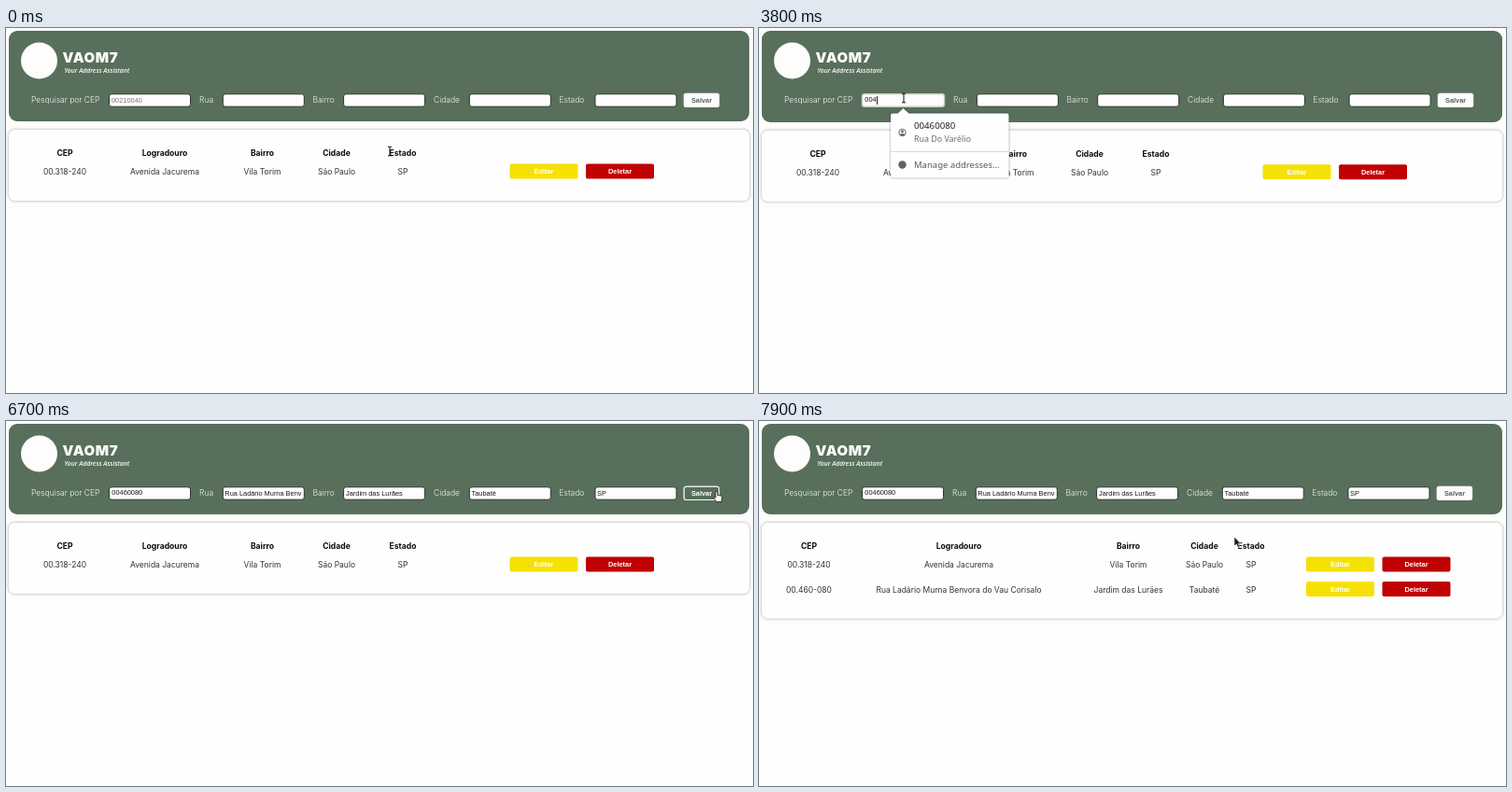
An HTML page that plays this animation: 800x391 px, repeating every 8 s.

```html
<!DOCTYPE html>
<html lang="pt-BR">
<head>
<meta charset="utf-8">
<title>Cadastro de endereços</title>
<style>
html, body { margin: 0; width: 100%; height: 100%; overflow: hidden; background: #fdfdfc; }
svg { display: block; width: 100vw; height: 100vh; }
text { font: 400 8.5px Inter, sans-serif; fill: #333; }
.labels text { fill: #f1f4f0; font-weight: 300; }
.mid text { text-anchor: middle; }
.head text { font-weight: 700; fill: #0c0c0c; font-size: 8.6px; }
.brand { font: 900 15px Inter, sans-serif; letter-spacing: .6px; fill: #fdfdfc; }
.tag { font: italic 600 6.8px "Open Sans", sans-serif; fill: #fdfdfc; }
.val text, .typed { font: 400 7.4px "Liberation Sans", Arial, sans-serif; fill: #151515; color: #151515; }
.val .hint { fill: #777; }
.btn text, .btn { font: 700 7.4px "Liberation Sans", Arial, sans-serif; text-anchor: middle; fill: #fff; }
.menu text { font: 400 9.5px "Noto Sans", sans-serif; fill: #55585c; }
.menu .pick { font-size: 9.7px; fill: #222; }
.menu .sub { font-size: 8.9px; fill: #6b6e72; }
.box rect { width: 87px; height: 13.4px; rx: 2.5px; fill: #fefefe; stroke: #2b332c; stroke-width: 1; }
.card { fill: #fefefe; stroke: #dcdcdc; filter: drop-shadow(0 0 .8px #ccc); }

.hint, .focus, .menu, .filled, .hover, .before, .after, .beam, .arrow, .hand, .dx, .dy, .typed, .cursor {
  animation: 8s step-end infinite;
}
.hint { animation-name: hint; }
.focus { animation-name: focus; }
.menu { animation-name: menu; }
.filled { animation-name: filled; }
.hover { animation-name: hover; }
.before { animation-name: before; }
.after { animation-name: after; }
.beam { animation-name: beam; }
.arrow { animation-name: arrow; }
.hand { animation-name: hand; }
.dx { animation-name: dx; }
.dy { animation-name: dy; }
.typed {
  height: 8.4px; line-height: 8.4px; width: 0; overflow: hidden; white-space: nowrap;
  border-right: .7px solid transparent;
  animation-name: type, caret;
}
.cursor { animation-name: move; }

@keyframes hint   { 0% { opacity: 1 } 41.25%, 100% { opacity: 0 } }
@keyframes focus  { 0% { opacity: 0 } 33.75% { opacity: 1 } 81.25%, 100% { opacity: 0 } }
@keyframes menu   { 0% { opacity: 0 } 42.5% { opacity: 1 } 81.25%, 100% { opacity: 0 } }
@keyframes filled { 0% { opacity: 0 } 82.5%, 100% { opacity: 1 } }
@keyframes hover  { 0% { opacity: 0 } 78.75% { opacity: 1 } 91.25%, 100% { opacity: 0 } }
@keyframes before { 0% { opacity: 1 } 88.75%, 100% { opacity: 0 } }
@keyframes after  { 0% { opacity: 0 } 88.75%, 100% { opacity: 1 } }
@keyframes beam   { 0% { opacity: 1 } 8.75% { opacity: 0 } 27.5% { opacity: 1 } 72.5%, 100% { opacity: 0 } }
@keyframes arrow  { 0% { opacity: 0 } 8.75% { opacity: 1 } 27.5% { opacity: 0 } 72.5% { opacity: 1 } 78.75% { opacity: 0 } 91.25%, 100% { opacity: 1 } }
@keyframes hand   { 0% { opacity: 0 } 78.75% { opacity: 1 } 91.25%, 100% { opacity: 0 } }
@keyframes dx { 0% { transform: none } 33.75% { transform: translate(1.1px, 0) } 81.25%, 100% { transform: none } }
@keyframes dy { 0% { transform: none } 33.75% { transform: translate(0, .8px) } 81.25%, 100% { transform: none } }
@keyframes type {
  0% { width: 0 } 41.25% { width: 1ch } 45% { width: 2ch } 47.5% { width: 3ch }
  51.25% { width: 4ch } 53.75% { width: 5ch } 56.25% { width: 6ch }
  58.75% { width: 7ch } 61.25%, 100% { width: 8.1ch }
}
@keyframes caret {
  0% { border-color: transparent } 33.75% { border-color: #222 } 40% { border-color: transparent }
  41.25% { border-color: #222 } 67.5%, 100% { border-color: transparent }
}
/* the pointer advances ten times a second */
@keyframes move {
  0%     { transform: translate(411px, 132px) }
  7.5%   { transform: translate(411px, 132px); animation-timing-function: steps(7) }
  16.25% { transform: translate(2px, 229px) }
  17.5%  { transform: translate(1px, 288px) }
  18.75% { transform: translate(8px, 280px) }
  20%    { transform: translate(8px, 280px); animation-timing-function: steps(7) }
  28.75% { transform: translate(156px, 78px) }
  33.75% { transform: translate(155px, 75px) }
  66.25% { transform: translate(155px, 75px); animation-timing-function: steps(9) }
  77.5%  { transform: translate(762px, 92px); animation-timing-function: steps(3) }
  81.25% { transform: translate(761px, 75px) }
  90%    { transform: translate(761px, 75px); animation-timing-function: steps(7) }
  98.75%, 100% { transform: translate(509px, 124px) }
}
</style>
</head>
<body>
<svg viewBox="0 0 800 391" preserveAspectRatio="none">
  <defs>
    <g id="actions" class="btn">
      <rect width="73" height="16" rx="2" fill="#f6e105"/>
      <text x="36.5" y="10.6">Editar</text>
      <rect x="81.5" width="73" height="16" rx="2" fill="#c10004"/>
      <text x="118" y="10.6">Deletar</text>
    </g>
  </defs>

  <!-- header -->
  <g fill="#586f5c">
    <rect x="3" y="3" width="793" height="97" rx="9"/>
    <rect class="focus" x="3" y="4" width="793" height="97" rx="9"/>
  </g>
  <circle cx="35.5" cy="35" r="19.5" fill="#fdfdfc"/>
  <text class="brand" x="60.5" y="37">VAOM7</text>
  <text class="tag" x="62.5" y="48.3">Your Address Assistant</text>

  <g class="labels"><text x="27" y="80">Pesquisar por CEP</text></g>
  <g class="box">
    <rect x="110.5" y="70.8"/>
    <rect class="focus" x="110.5" y="70.8" style="width:88px;stroke:#c9d0ca;stroke-width:1.4"/>
  </g>
  <g class="val"><text class="hint" x="113" y="80">00210040</text></g>
  <foreignObject x="113.3" y="73.3" width="80" height="9">
    <div class="typed">00460080</div>
  </foreignObject>

  <g class="dx">
    <g class="labels">
      <text x="207" y="80">Rua</text>
      <text x="328.5" y="80">Bairro</text>
      <text x="458" y="80">Cidade</text>
      <text x="592.5" y="80">Estado</text>
    </g>
    <g class="box">
      <rect x="232.3" y="70.8"/>
      <rect x="361.6" y="70.8"/>
      <rect x="496.3" y="70.8"/>
      <rect x="631" y="70.8"/>
    </g>
    <g class="val filled">
      <text x="234.3" y="80">Rua Ladário Murna Benv</text>
      <text x="364" y="80">Jardim das Lurães</text>
      <text x="498.5" y="80">Taubaté</text>
      <text x="633" y="80">SP</text>
    </g>
    <rect x="725.7" y="69.8" width="38.4" height="15.2" rx="2.5" fill="#fdfdfc"/>
    <text class="btn" x="745" y="80" style="fill:#56645a">Salvar</text>
    <g class="hover">
      <rect x="726.2" y="70.3" width="37.4" height="14.2" rx="2.5" fill="#586f5c" stroke="#fdfdfc"/>
      <text class="btn" x="745" y="80">Salvar</text>
    </g>
  </g>

  <!-- address list -->
  <g class="dy mid">
    <g class="before">
      <rect class="card" x="2.5" y="108.5" width="794" height="77" rx="7"/>
      <g class="head">
        <text x="63" y="137.2">CEP</text>
        <text x="170" y="137.2">Logradouro</text>
        <text x="274.5" y="137.2">Bairro</text>
        <text x="354" y="137.2">Cidade</text>
        <text x="425" y="137.2">Estado</text>
      </g>
      <text x="63" y="157">00.318-240</text>
      <text x="170" y="157">Avenida Jacurema</text>
      <text x="274.5" y="157">Vila Torim</text>
      <text x="354" y="157">São Paulo</text>
      <text x="425" y="157">SP</text>
      <use href="#actions" x="539.5" y="145.5"/>
    </g>
    <g class="after">
      <rect class="card" x="2.5" y="108.5" width="794" height="103.5" rx="7"/>
      <g class="head">
        <text x="53.5" y="137.2">CEP</text>
        <text x="214" y="137.2">Logradouro</text>
        <text x="395.5" y="137.2">Bairro</text>
        <text x="477" y="137.2">Cidade</text>
        <text x="527" y="137.2">Estado</text>
      </g>
      <text x="53.5" y="157">00.318-240</text>
      <text x="214" y="157">Avenida Jacurema</text>
      <text x="395.5" y="157">Vila Torim</text>
      <text x="477" y="157">São Paulo</text>
      <text x="527" y="157">SP</text>
      <use href="#actions" x="586" y="145.5"/>
      <text x="53.5" y="183.7">00.460-080</text>
      <text x="214" y="183.7">Rua Ladário Murna Benvora do Vau Corisalo</text>
      <text x="395.5" y="183.7">Jardim das Lurães</text>
      <text x="477" y="183.7">Taubaté</text>
      <text x="527" y="183.7">SP</text>
      <use href="#actions" x="586" y="172"/>
    </g>
  </g>

  <!-- autofill menu -->
  <g class="menu">
    <path d="M143 91.5H148.5L154.5 86L160.5 91.5H265.5Q267.5 91.5 267.5 93.5V158.5Q267.5 160.5 265.5 160.5H143Q141 160.5 141 158.5V93.5Q141 91.5 143 91.5Z"
      fill="#fefefe" style="filter:drop-shadow(0 .8px 1.2px rgba(0,0,0,.45))"/>
    <path d="M141 132.5H267.5" stroke="#dadada"/>
    <g fill="#5f6368">
      <circle cx="153.5" cy="112" r="3.7" fill="none" stroke="#5f6368"/>
      <circle cx="153.5" cy="110.9" r="1.4"/>
      <path d="M150.8 114.3Q153.5 111.8 156.2 114.3Q153.5 117 150.8 114.3Z"/>
      <circle cx="153.5" cy="146.5" r="4.2"/>
    </g>
    <text class="pick" x="166" y="108.3">00460080</text>
    <text class="sub" x="166" y="122.4">Rua Do Varélio</text>
    <text x="166" y="150.2">Manage addresses…</text>
  </g>

  <!-- pointer -->
  <g class="cursor">
    <path class="beam" d="M-2 -5Q0 -5 0 -4Q0 -5 2 -5M0 -4V4M-2 5Q0 5 0 4Q0 5 2 5" fill="none" stroke="#222" stroke-width="1.1"/>
    <path class="arrow" d="M0 0V10L2.3 8L4 11.8L5.6 11L4 7.4H7Z" fill="#1c1c1c" stroke="#fff" stroke-width=".6"/>
    <path class="hand" d="M-1 .8Q0 -.8 1 .8V4.4L4.9 5.2Q6 5.6 6 6.8L5 11.6H-.2L-3 7.6Q-3.2 6.2 -1 7.2Z" fill="#fff" stroke="#1c1c1c" stroke-width=".8"/>
  </g>
</svg>
</body>
</html>
```
